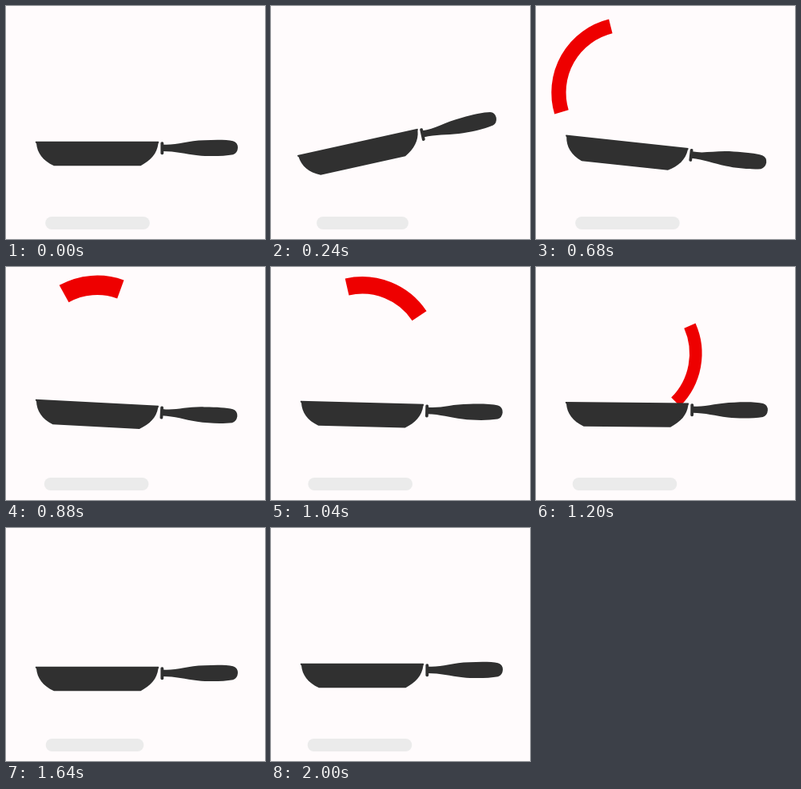
These frames come from a looping animation (324x292 px, 2280 ms). An HTML page:

```html
<!DOCTYPE html>
<html lang="en">
<head>
<meta charset="utf-8">
<title>Frying pan loader</title>
<style>
  html, body { margin: 0; width: 100%; height: 100%; overflow: hidden; background: #fffbfc; }
  svg { display: block; width: 324px; height: 292px; }
</style>
</head>
<body>
<svg viewBox="0 0 324 292">
  <rect id="shadow" y="264" height="16" rx="8" fill="#ebebeb"/>
  <path id="pancake" fill="none" stroke="#ee0000"/>
  <g id="pan" fill="#303030">
    <path d="M37 169.800H190.800Q191.800 171 190.500 172.300C189 185 181 193.500 168.500 200.200H60C46 194 39 184 38 172.300Q36 171 37 169.800Z"/>
    <rect x="193.400" y="170.300" width="3.800" height="16" rx="1.700"/>
    <path d="M196 173.600C212 175 226 168.800 248 168.300C262 167.500 276 167.500 284 169.200Q290 171 290 177.700Q289.500 184.300 284 186.200C272 188.300 254 188.700 240 187.200C224 185.500 212 182 196 182Z"/>
  </g>
</svg>
<script>
const LOOP = 2280, STEP = 40, LAST = 2000;
const CX = 114.1, CY = 108.5, R = 85.7;
const ARC_START = 135, ARC_END = 405;

const ramp = (t, from, to) => Math.min(1, Math.max(0, (t - from) / (to - from)));
const mix = (a, b, u) => a + (b - a) * u;
const smooth = u => u * u * (3 - 2 * u);
const bump = u => Math.sin(Math.PI * u) ** 2;

// Wind up, flick, then settle.
function tiltAt(t) {
  if (t < 440) return -22 * smooth(ramp(t, 0, 440));
  if (t < 640) return mix(-22, 6.9, smooth(ramp(t, 440, 640)));
  return 6.9 * (1 - ramp(t, 640, 1640)) ** 3;
}

// Slows on the way up to the apex and speeds up on the way down.
function toss(t, start, top, end, apex) {
  const up = 1 - (1 - ramp(t, start, top)) ** 2;
  const down = ramp(t, top, end) ** 2;
  return mix(ARC_START, apex, up) + (ARC_END - apex) * down;
}

function point(deg) {
  const a = deg * Math.PI / 180;
  return `${CX + R * Math.cos(a)} ${CY + R * Math.sin(a)}`;
}

const [shadow, pancake, pan] = ["shadow", "pancake", "pan"].map(id => document.getElementById(id));

function drawPan(t) {
  const tilt = tiltAt(t), lift = Math.max(0, -tilt);
  const dip = 4 * bump(ramp(t, 1280, 2000));
  pan.setAttribute("transform",
    `translate(${-0.455 * lift} ${dip + 0.045 * lift}) rotate(${tilt} 114 170)`);

  const middle = mix(114.5, 111, smooth(ramp(t, 640, 1200)));
  const half = 65.3 - 0.63 * lift - dip;
  shadow.setAttribute("x", middle - half);
  shadow.setAttribute("width", 2 * half);
}

function drawPancake(t) {
  const head = toss(t, 510, 820, 1200, 287);
  const tail = toss(t, 635, 975, 1277, 250);
  pancake.setAttribute("visibility", head > tail ? "visible" : "hidden");
  pancake.setAttribute("d", `M${point(tail)}A${R} ${R} 0 0 1 ${point(head)}`);
  pancake.setAttribute("stroke-width", 14.5 + 10 * bump(ramp(t, 520, 1280)));
}

const start = performance.now();
function tick() {
  const elapsed = (performance.now() - start) % LOOP;
  const t = Math.min(Math.floor(elapsed / STEP) * STEP, LAST);
  drawPan(t);
  drawPancake(t);
  requestAnimationFrame(tick);
}
tick();
</script>
</body>
</html>
```
